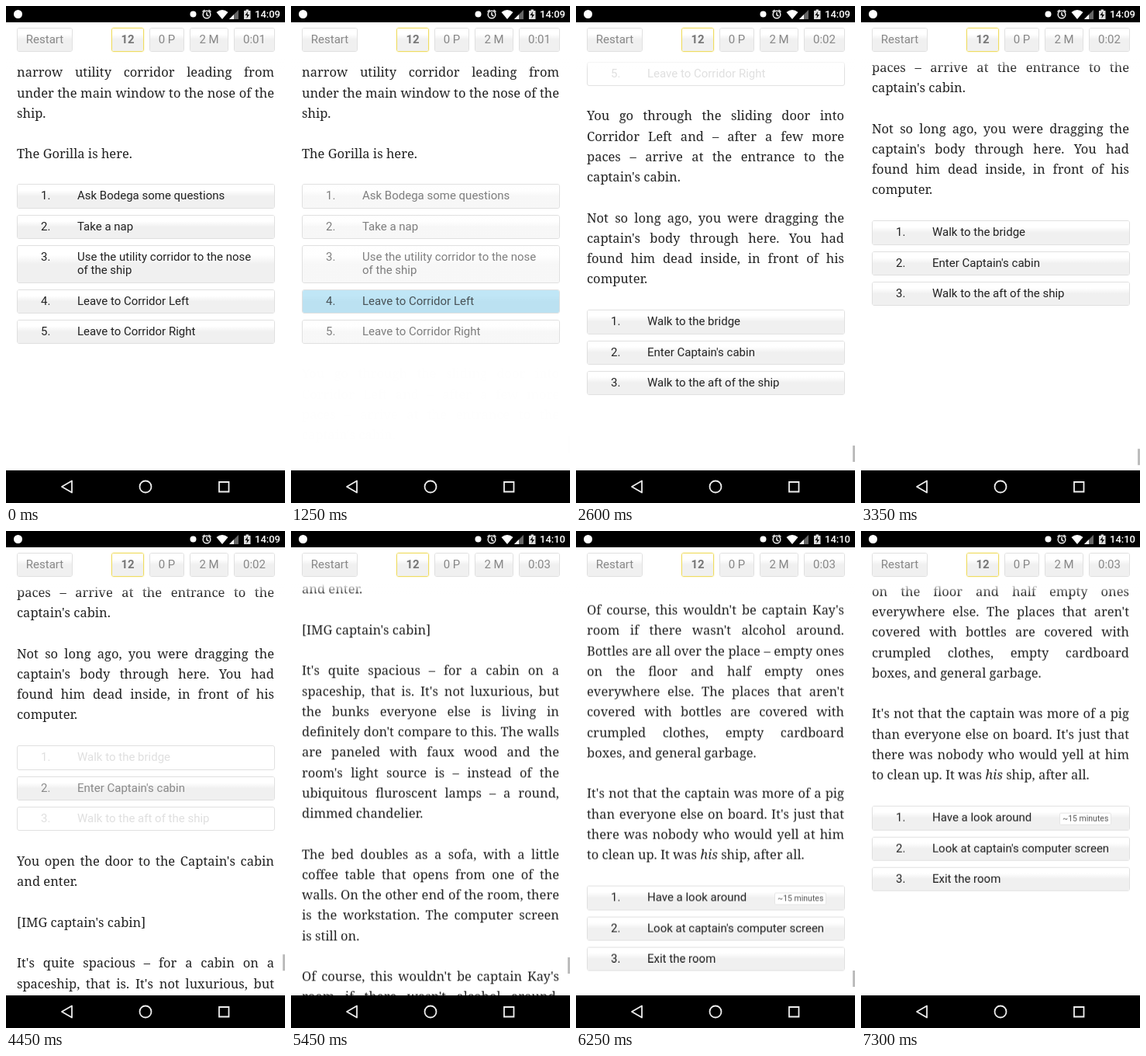
An HTML page for the animation above (8000 ms loop, 360 px wide and 640 px high).

```html
<!DOCTYPE html>
<html lang="en">
<head>
<meta charset="utf-8">
<style>
html, body { margin: 0; width: 100%; height: 100%; overflow: hidden; background: #fff; }
#stage { position: relative; width: 360px; height: 640px; overflow: hidden; background: #fff; }
#stage div { position: absolute; box-sizing: border-box; white-space: nowrap; }
#doc { left: 0; top: 0; width: 360px; will-change: transform; }
#stage .line { left: 14px; width: 332px; height: 26px; font: 16.5px/26px "Noto Serif", serif; color: #222; }
#stage .full { text-align: justify; text-align-last: justify; }
.box { border: 1px solid #e0e0e0; border-radius: 3px; overflow: hidden; }
.box, .tag { font: 15px/17.5px Roboto, sans-serif; color: #222; }
.face { inset: 0; background: linear-gradient(#fff 25%, #f0f0f0 50%); }
.tap { inset: 0; background: #a5dcf2; opacity: 0; }
#stage .tag { left: 241px; top: 8px; height: 16px; padding: 0 3px; border: 1px solid #e6e6e6;
  border-radius: 2px; background: #fff; font-size: 10.5px; line-height: 14px; color: #555; }
#head { left: 0; top: 21px; width: 360px; height: 60px; background: linear-gradient(#fff 47px, #fff0); }
#head .box { top: 7px; height: 31px; line-height: 28px; text-align: center; color: #888; }
#head .box span { position: relative; }
#head .gold { border-color: #efdc60; box-shadow: 0 0 2px #f6ea9c; font-weight: bold; color: #777; }
#bar { left: 357px; top: 0; width: 3px; height: 21px; background: #bdbdbd; }
svg { position: absolute; left: 0; top: 0; }
</style>
</head>
<body>
<div id="stage">
  <div id="doc"></div>
  <div id="head"></div>
  <div id="bar"></div>
  <svg width="360" height="640">
    <path d="M0 0H360V21H0ZM0 598H360V640H0Z"/>
    <g fill="#fff">
      <circle cx="15.5" cy="10.5" r="5.5"/>
      <circle cx="241.5" cy="10.5" r="4"/>
      <path d="M271.5 8Q279 2 286.500 8L279 17Z"/>
      <path d="M288 17H300V5Z" fill="#666"/>
      <path d="M288 17H294V11Z"/>
      <path d="M307 6H309.500V4.500H313V6H315.500V17H307Z" fill="#ddd"/>
      <path d="M312 7L308.500 12H311L310.500 16L314 11H311.500Z" fill="#000"/>
      <text id="clock" x="321" y="15.300" font-family="Roboto, sans-serif" font-size="13" font-weight="500"></text>
    </g>
    <g fill="none" stroke="#eee" stroke-width="1.500">
      <circle cx="259" cy="11" r="4.800"/>
      <path d="M259 8V11.500L261.500 13M253.500 7.500L256.500 5M264.500 7.500L261.500 5"/>
      <g stroke-width="1.800">
        <path d="M72 619L85 611.500V626.500Z" stroke-linejoin="round"/>
        <circle cx="180" cy="619" r="7.500"/>
        <path d="M275 613H287.500V625.500H275Z"/>
      </g>
    </g>
  </svg>
</div>
<script>
const $ = id => document.getElementById(id);
const ROW = 26.25;

function add(parent, cls, html, css) {
  const el = document.createElement('div');
  el.className = cls;
  el.innerHTML = html;
  Object.assign(el.style, css);
  return parent.appendChild(el);
}

function section() {
  return add($('doc'), '', '', { left: 0, top: 0, width: '360px' });
}

// Only lines followed by another line of the same paragraph are justified.
function prose(parent, middle, text) {
  const lines = text.trim().split('\n');
  lines.forEach((line, i) => {
    if (line) add(parent, lines[i + 1] ? 'line full' : 'line', line,
      { top: middle - 13 + i * ROW + 'px' });
  });
}

function choices(parent, top, labels) {
  return labels.map((label, i) => {
    const extra = label.includes('<br>') ? 17.5 : 0;
    const box = add(parent, 'box', '',
      { left: '14px', top: top + 'px', width: '333px', height: 31.3 + extra + 'px' });
    top += 39.25 + extra;
    const face = add(box, 'face', '');
    const tap = add(box, 'tap', '');
    const text = add(box, '', '', { inset: 0 });
    add(text, '', i + 1 + '.', { left: '30px', top: '6px' });
    add(text, '', label, { left: '77px', top: '6px' });
    return { box, face, tap, text };
  });
}

const first = section(), second = section(), third = section();

prose(first, 85.3, `
narrow utility corridor leading from
under the main window to the nose of the
ship.

The Gorilla is here.`);
const menu1 = choices(first, 229.3, ['Ask Bodega some questions', 'Take a nap',
  'Use the utility corridor to the nose<br>of the ship',
  'Leave to Corridor Left', 'Leave to Corridor Right']);

prose(second, 473.3, `
You go through the sliding door into
Corridor Left and – after a few more
paces – arrive at the entrance to the
captain's cabin.

Not so long ago, you were dragging the
captain's body through here. You had
found him dead inside, in front of his
computer.`);
const menu2 = choices(second, 723.3,
  ['Walk to the bridge', "Enter Captain's cabin", 'Walk to the aft of the ship']);

prose(third, 872, `
You open the door to the Captain's cabin
and enter.

[IMG captain's cabin]

It's quite spacious – for a cabin on a
spaceship, that is. It's not luxurious, but
the bunks everyone else is living in
definitely don't compare to this. The walls
are paneled with faux wood and the
room's light source is – instead of the
ubiquitous fluroscent lamps – a round,
dimmed chandelier.

The bed doubles as a sofa, with a little
coffee table that opens from one of the
walls. On the other end of the room, there
is the workstation. The computer screen
is still on.

Of course, this wouldn't be captain Kay's
room if there wasn't alcohol around.
Bottles are all over the place – empty ones
on the floor and half empty ones
everywhere else. The places that aren't
covered with bottles are covered with
crumpled clothes, empty cardboard
boxes, and general garbage.

It's not that the captain was more of a pig
than everyone else on board. It's just that
there was nobody who would yell at him
to clean up. It was <i>his</i> ship, after all.`);
const menu3 = choices(third, 1752.3,
  ['Have a look around', "Look at captain's computer screen", 'Exit the room']);
add(menu3[0].box, 'tag', '~15 minutes');

const timer = [['Restart', 14, 72], ['12', 136, 42], ['0 P', 185, 45], ['2 M', 237, 50], ['', 294, 53]]
  .map(([label, x, w]) => add($('head'), label === '12' ? 'box gold' : 'box',
    `<div class="face"></div><span>${label}</span>`, { left: x + 'px', width: w + 'px' }))
  .pop().querySelector('span');

// Scroll keys: time, offset, speed in px/ms
const keys = [[0, 0, 0], [1650, 0, 0], [2000, 116, .42], [3350, 447, 0], [4850, 447, 0],
  [5450, 823, .65], [6250, 1295, .45], [6750, 1398.3, 0], [8000, 1398.3, 0]];

function scrollAt(t) {
  const i = keys.findIndex(k => k[0] > t);
  const [t0, y0, v0] = keys[i - 1], [t1, y1, v1] = keys[i];
  const d = t1 - t0, u = (t - t0) / d, w = 1 - u;
  return w * w * ((1 + 2 * u) * y0 + u * d * v0) + u * u * ((3 - 2 * u) * y1 - w * d * v1);
}

const ramp = (t, a, b) => Math.min(1, Math.max(0, (t - a) / (b - a)));

function choose(menu, pick, fade, glow) {
  menu.forEach(({ box, face, tap, text }, i) => {
    const on = i === pick;
    text.style.opacity = 1 - fade * (on ? .5 : .86);
    face.style.opacity = on ? 1 : 1 - fade;
    tap.style.opacity = on ? glow : 0;
  });
}

function draw(t) {
  const y = scrollAt(t);
  $('doc').style.transform = `translateY(${-y}px)`;

  choose(menu1, 3, ramp(t, 1100, 1400),
    .7 * ramp(t, 1000, 1080) - .4 * ramp(t, 1250, 1500) - .3 * ramp(t, 1950, 2500));
  choose(menu2, 1, ramp(t, 3700, 4050), .7 * (ramp(t, 3550, 3630) - ramp(t, 3850, 4150)));
  second.style.opacity = ramp(t, 1250, 1500);
  third.style.opacity = ramp(t, 3900, 4250);

  const barY = t < 4800
    ? 554 + .0363 * y - 25 * ramp(t, 3900, 4000)
    : 549 + .036 * (y - 823);
  $('bar').style.transform = `translateY(${barY}px)`;
  $('bar').style.opacity = ramp(t, 1250, 1350) - ramp(t, 4450, 4700)
    + ramp(t, 4850, 4900) - ramp(t, 7000, 7300);

  timer.textContent = t < 1500 ? '0:01' : t < 4550 ? '0:02' : '0:03';
  $('clock').textContent = t < 4550 ? '14:09' : '14:10';
}

function tick() {
  draw(performance.now() % 8000);
  requestAnimationFrame(tick);
}
tick();
</script>
</body>
</html>
```
